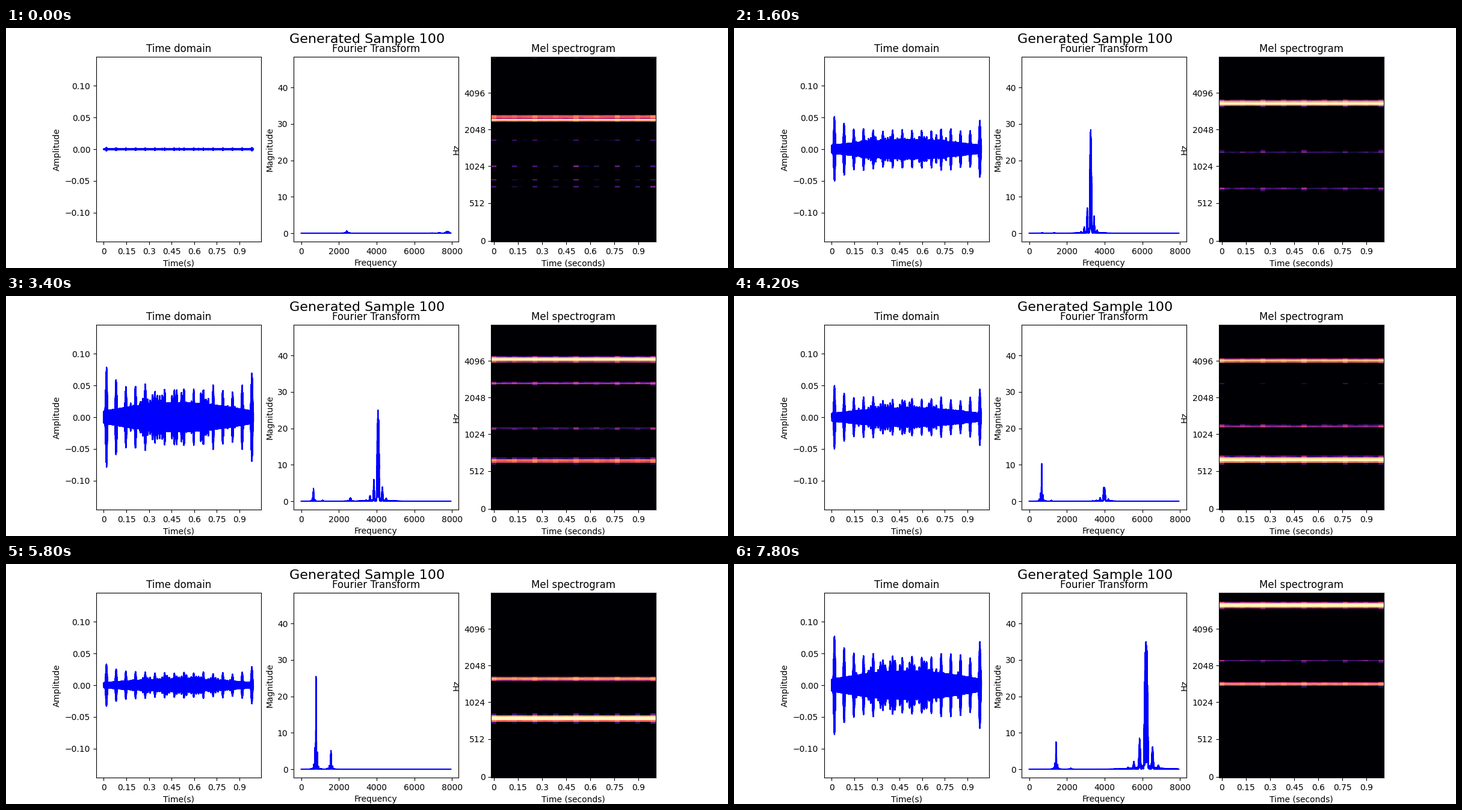
A matplotlib script for the animation above (8 s loop, 1200 by 400 pixels).

```python
import numpy as np
import matplotlib.pyplot as plt
from matplotlib.animation import FuncAnimation

FRAMES, STEP_MS = 40, 200
RATE, COUNT = 16000, 15872
ROWS, COLS, HOP = 128, 32, 512

# Gliding tones as (frame, hz, peak); a single point is a short swell
TONES = [
    [(0, 2420, .6), (5, 3091, 31), (11, 3428, 26), (17, 4080, 25), (25, 3880, .1)],
    [(11, 1334, 6), (17, 1135, .25), (25, 1230, .2), (33, 1930, 30), (39, 2200, .25)],
    [(5, 770, .1), (11, 635, .3), (25, 675, 24), (33, 905, 27), (39, 1430, 7.5)],
    [(0, 2560, .1)],
    [(0, 7750, .4)],
    [(11, 6000, .25)],
    [(17, 2610, .9)],
    [(39, 6200, 35)],
]
HUM = [(hz, .0012) for hz in (735, 830, 1015, 1660)]

# Waveform height at its key frames
KEYS = [0, 5, 11, 17, 25, 33, 39]
LOUDNESS = [.0015, .031, .030, .047, .0125, .027, .046]
PULSE = .0643

rng = np.random.default_rng(7)
time = np.arange(COUNT) / RATE
bins = np.arange(COUNT // 2 + 1)
ragged = rng.uniform(.04, 1, bins.size)


def bump(x, centre, width, power=2):
    return np.exp(-np.abs((x - centre) / width) ** power)


def envelope():
    """Regular pulses with smaller random ones between, tall at both ends."""
    env = .2 + .28 * np.sin(np.pi * time / time[-1])
    env = np.maximum(env, 1.7 * bump(time, .018, .0065))
    env = np.maximum(env, 1.5 * bump(time, .982, .0065))
    for j in range(4, 58):
        t = .018 + j * PULSE / 4
        if j % 4 == 0:
            height = rng.uniform(.85, 1.1) + .35 * np.exp(1 - j / 4)
        else:
            height = rng.uniform(.35, .95) * np.sin(np.pi * t)
        env = np.maximum(env, height * bump(time, t, .0065))
    return env


envelopes = [level * envelope() for level in LOUDNESS]


def mel(f):
    high = 15 + np.log(max(f, 1000) / 1000) * 27 / np.log(6.4)
    return f * 3 / 200 if f < 1000 else high


def mel_to_hz(m):
    return np.where(m < 15, m * 200 / 3, 1000 * np.exp((m - 15) * np.log(6.4) / 27))


mel_step = mel(8000) / (ROWS - 1)
f_edges = mel_to_hz((np.arange(ROWS + 1) - .5) * mel_step)
t_edges = (np.arange(COLS + 1) - .5) * HOP / RATE

# Every fourth and eighth column of the spectrogram stands out
boost = rng.uniform(0, .35, (ROWS, COLS))
boost[:, ::4] += .3
boost[:, ::8] += .3
boost[:, -1] += .6


def tone_at(points, frame):
    frames, hz, peaks = np.array(points, float).T
    peak = np.interp(frame, frames, peaks ** .25) ** 4
    outside = max(frames[0] - frame, frame - frames[-1], 0)
    return np.interp(frame, frames, hz), peak * np.exp(-1.2 * outside)


def wave(frame, tones):
    i = min(np.searchsorted(KEYS, frame, side="right") - 1, len(KEYS) - 2)
    u = (frame - KEYS[i]) / (KEYS[i + 1] - KEYS[i])
    env = envelopes[i] * (1 - u) + envelopes[i + 1] * u
    main = max(tones, key=lambda tone: tone[1])[0]
    return env * np.sin(2 * np.pi * main * time)


def spectrum(tones):
    total = np.zeros(bins.size)
    for f, peak in tones:
        gap = max(60, .05 * f)
        shape = .04 * np.exp(-np.abs(bins - f) / (1.5 * gap))
        shape = np.maximum(shape, bump(bins, f, .32 * gap, 4))
        for n in range(1, 5):
            for side, ratio in ((-1, .25), (1, .18)):
                lobe = bump(bins, f + side * (n + .1) * gap, .17 * gap)
                shape = np.maximum(shape, ratio ** n * lobe)
        shape *= ragged
        total = np.maximum(total, shape * peak / shape.max())
    return total


def spectrogram(tones):
    loudest = max(peak for _, peak in tones)
    image = np.zeros((ROWS, COLS))
    rows = np.arange(ROWS)
    for f, peak in tones:
        level = 1.05 + .145 * np.log(peak / loudest)
        level -= .85 * np.clip((f - 7000) / 500, 0, 1)
        hz = f * (1.008 + .025 * np.clip((f - 2000) / 1000, 0, 1))
        sharp = .13 + .15 * max(0, 1.5 - np.log10(peak))
        v = level - sharp * (rows - mel(hz) / mel_step) ** 2
        v = np.where(v > -.15, v, -9)[:, None]
        image = np.maximum(image, v + .55 * (1 - v).clip(0, 1.15) * (boost - .5))
    return image.clip(0, 1)


fig, (ax_t, ax_f, ax_m) = plt.subplots(1, 3, figsize=(12, 4), dpi=100)
fig.suptitle("Generated Sample 100", fontsize=16, y=.9775)
seconds = np.arange(7) * .15
names = [f"{s:g}" for s in seconds]

ax_t.set(title="Time domain", xlabel="Time(s)", ylabel="Amplitude",
         xlim=(-.0496, 1.0416), ylim=(-.1458, .1458))
ax_t.set_xticks(seconds, names)
ax_t.set_yticks(np.arange(-2, 3) * .05)
wave_line, = ax_t.plot([], [], color="blue")

ax_f.set(title="Fourier Transform", xlabel="Frequency", ylabel="Magnitude",
         xlim=(-396.8, 8332.8), ylim=(-2.305, 48.405))
ax_f.set_xticks(range(0, 8001, 2000))
ax_f.set_yticks(range(0, 41, 10))
spec_line, = ax_f.plot([], [], color="blue")

mesh = ax_m.pcolormesh(t_edges, f_edges, np.zeros((ROWS, COLS)),
                       cmap="magma", vmin=0, vmax=1)
ax_m.set_yscale("symlog", base=2, linthresh=1000, linscale=1)
ax_m.set(title="Mel spectrogram", xlabel="Time (seconds)", ylabel="Hz",
         xlim=(t_edges[0], t_edges[-1]), ylim=(f_edges[0], f_edges[-1]))
ax_m.set_xticks(seconds, names)
pitches = [0, 512, 1024, 2048, 4096]
ax_m.set_yticks(pitches, [str(p) for p in pitches])
ax_m.minorticks_off()


def draw(frame):
    tones = [tone_at(points, frame) for points in TONES] + HUM
    wave_line.set_data(time, wave(frame, tones))
    spec_line.set_data(bins, spectrum(tones))
    mesh.set_array(spectrogram(tones))
    return wave_line, spec_line, mesh


anim = FuncAnimation(fig, draw, frames=FRAMES, interval=STEP_MS,
                     repeat=True, repeat_delay=0, blit=False)
plt.show()
```
